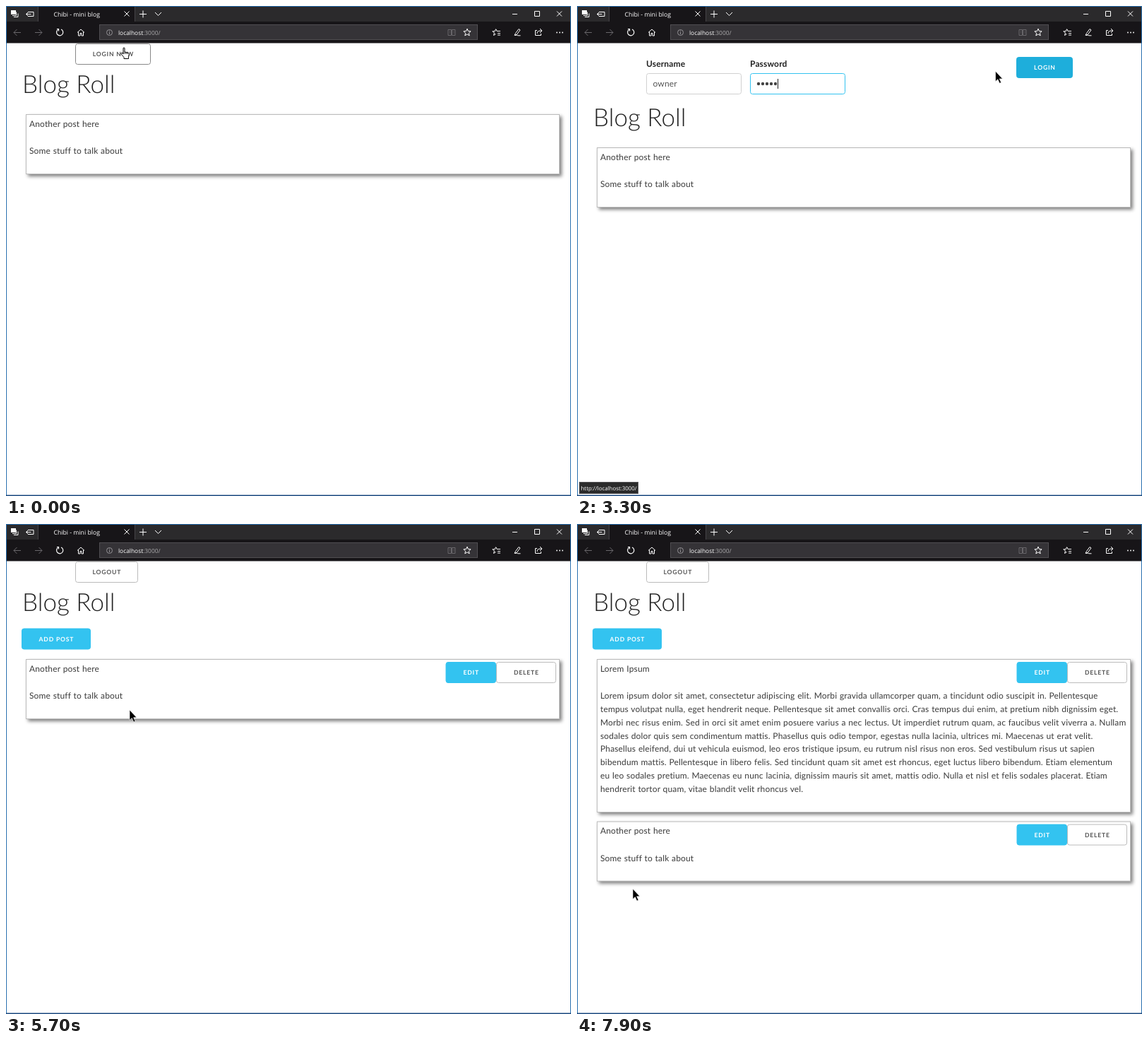
Write an HTML page that moves like this. It is 800 px wide and 693 px high and loops after 8 s.

```html
<!DOCTYPE html>
<html lang="en">
<head>
<meta charset="utf-8">
<title>Chibi - mini blog</title>
<style>
html, body { margin: 0; width: 100%; height: 100%; overflow: hidden; background: #fff; }
svg { display: block; width: 800px; height: 693px; }
text { font: 12px Lato, sans-serif; letter-spacing: .14px; word-spacing: .5px; fill: #3c3c3c; white-space: pre; text-rendering: geometricPrecision; }
.title { font-size: 35px; font-weight: 300; letter-spacing: 0; word-spacing: 0; fill: #222; }
.label { font-weight: 700; fill: #222; }
.entry { fill: #555; }
.btn { font-size: 8.6px; font-weight: 700; letter-spacing: .8px; word-spacing: 0; text-anchor: middle; fill: #555; }
.white { fill: #fff; }
.ui { font: 8.7px "Open Sans", sans-serif; letter-spacing: 0; word-spacing: 0; fill: #fff; }
.url { font-size: 8.4px; }
.status { font-size: 7.9px; }
.post { fill: #fff; stroke: #bbb; filter: drop-shadow(3px 3px 2.5px #808080); }
.icon { fill: none; stroke: #fff; }
.dim { stroke: #69676b; }
</style>
</head>
<body>
<svg id="stage" viewBox="0 0 800 693"></svg>
<script>
const stage = document.getElementById('stage');
const LOOP = 8000, STEP = 100, LINE = 18.87;
const BLUE = '#33c3f0';

// "|" breaks a line in the editor, "/" in a finished post
const LOREM = 'Lorem ipsum dolor sit amet, consectetur adipiscing elit. Morbi gravida ullamcorper quam, a tincidunt odio suscipit in. Pellentesque|/' +
  'tempus volutpat nulla, eget hendrerit neque. Pellentesque sit amet convallis orci. Cras tempus dui enim, at pretium nibh dignissim |eget. /' +
  'Morbi nec risus enim. Sed in orci sit amet enim posuere varius a nec lectus. Ut imperdiet rutrum quam, ac faucibus velit viverra a. |Nullam /' +
  'sodales dolor quis sem condimentum mattis. Phasellus quis odio tempor, egestas nulla lacinia, ultrices mi. Maecenas ut erat |velit. /' +
  'Phasellus eleifend, dui ut vehicula euismod, leo eros tristique ipsum, eu rutrum nisl risus non eros. Sed vestibulum risus ut sapien|/' +
  'bibendum mattis. Pellentesque in libero felis. Sed tincidunt quam sit amet est rhoncus, eget luctus libero bibendum. Etiam elementum|/' +
  'eu leo sodales pretium. Maecenas eu nunc lacinia, dignissim mauris sit amet, mattis odio. Nulla et nisl et felis sodales placerat. Etiam|/' +
  'hendrerit tortor quam, vitae blandit velit rhoncus vel.';

const text = (x, y, s, cls = '') => `<text x="${x}" y="${y}" class="${cls}">${s}</text>`;
const rect = (x, y, w, h, attrs) => `<rect x="${x}" y="${y}" width="${w}" height="${h}" ${attrs}/>`;
const icon = (d, cls = '', attrs = '') => `<path class="icon ${cls}" d="${d}" ${attrs}/>`;
const lines = (x, y, keep, drop) => LOREM.replaceAll(drop, '').split(keep)
  .map((s, i) => text(x, y + i * LINE, s)).join('');

function button(x, y, w, label, primary, hover) {
  const fill = primary ? (hover ? '#1eaedb' : BLUE) : '#fff';
  const stroke = primary ? fill : hover ? '#888' : '#bbb';
  return rect(x + .5, y + .5, w - 1, 29, `rx="3" fill="${fill}" stroke="${stroke}"`) +
    text(x + w / 2 + .4, y + 18, label, primary ? 'btn white' : 'btn');
}

const field = (x, y, w, h, focus) =>
  rect(x + .5, y + .5, w - 1, h - 1, `rx="3" fill="#fff" stroke="${focus ? BLUE : '#d1d1d1'}"`);
const caret = (x, y) => icon(`M${x + .5} ${y}v14`, '', 'style="stroke:#222"');

function post(y, title, body, h, owned) {
  return rect(28.5, y + .5, 755, h, 'class="post"') + text(33, y + 17.5, title) + body(y + 56) +
    (owned ? button(622.5, y + 4, 71.5, 'EDIT', true) + button(694, y + 4, 85, 'DELETE') : '');
}
const shortPost = (y, owned) =>
  post(y, 'Another post here', top => text(33, top, 'Some stuff to talk about'), 84, owned);
const longPost = y => post(y, 'Lorem Ipsum', top => lines(33, top, '/', '|'), 216, true);

const heading = y => text(23, y, 'Blog Roll', 'title');
const logout = () => button(98, 53, 89, 'LOGOUT');

const home = () => button(98, 53, 107, 'LOGIN NOW', false, true) + heading(123) + shortPost(153);

function loginForm(t) {
  const onName = t >= 800 && t < 2200, onPass = t >= 2200;
  const typed = t < 1500 ? 0 : t < 1700 ? 1 : Math.min(5, 2 + Math.floor((t - 1700) / 100));
  const dots = Math.max(0, Math.min(5, Math.floor((t - 2300) / 100)));
  let s = text(98, 86, 'Username', 'label') + text(245, 86, 'Password', 'label') +
    field(98, 95, 135, 30, onName) + field(245, 95, 135, 30, onPass) +
    text(107.5, 114, 'owner'.slice(0, typed), 'entry') +
    button(622, 72, 80, 'LOGIN', true, t >= 3300);
  if (onName) s += caret(107 + typed * 6.9, 103);
  if (onName && typed) s += icon('M211.5 106.5l7 7m0 -7l-7 7', '', 'style="stroke:#444"');
  for (let i = 0; i < dots; i++) s += `<circle cx="${257 + i * 6}" cy="110" r="2.2" fill="#444"/>`;
  if (onPass) s += caret(253 + dots * 6.2, 103);
  return s + heading(169.5) + shortPost(200);
}

const blog = (full, hover) => logout() + heading(123) + button(22, 147.5, 98, 'ADD POST', true, hover) +
  (full ? longPost(191) + shortPost(420.5, true) : shortPost(191, true));

const editor = t => logout() + text(22.5, 104, 'Creating New Post') +
  field(22, 109, 297, 52, t >= 6800 && t < 7000) + field(22, 172, 756, 315) +
  (t >= 6900 ? text(31, 129, 'Lorem Ipsum') : '') +
  (t >= 7100 ? lines(31, 191.5, '|', '/') : '') +
  button(22, 498, 87, 'SUBMIT', true, t >= 7500) + button(109, 498, 88, 'CANCEL');

function page(t) {
  if (t < 500) return home();
  if (t < 3500) return loginForm(t);
  if (t >= 4800 && t < 5200) return '';
  if (t < 6700) return blog(false, t >= 6300);
  return t < 7600 ? editor(t) : blog(true);
}

const star = (x, y, r) => 'M' + Array.from({ length: 10 }, (_, i) => {
  const a = i * Math.PI / 5, k = i % 2 ? r * .45 : r;
  return (x + k * Math.sin(a)).toFixed(1) + ' ' + (y - k * Math.cos(a)).toFixed(1);
}).join('L') + 'Z';

function chrome(t) {
  const loading = t >= 4800 && t < 5200, hover = t >= 4600 && t < 5300;
  let s = rect(0, 0, 800, 23, 'fill="#2b2a2c"') + rect(0, 22, 800, 30.5, 'fill="#171518"') +
    rect(45, 1, 137, 22, 'fill="#171518"') + icon('M45.5 1v21M182.5 1v21', '', 'style="stroke:#454447"') +
    rect(132.5, 26.5, 535, 21, 'fill="#353337" stroke="#504e52"');
  // title bar
  s += rect(7, 6, 7, 6, 'fill="#fff"') + icon('M9 13.5h5.5v-5M11 15.5h6v-5') +
    icon('M31 8.5h8v6h-8M28.5 11.5h7m-4.5 -2.5l-2.5 2.5l2.5 2.5') +
    text(67.5, 14.5, 'Chibi - mini blog', 'ui') +
    icon('M167.5 7.5l7 7m0 -7l-7 7M189 11.5h10m-5 -5v10M211 9l4.5 4.5l4.5 -4.5') +
    icon('M717 11.5h7M748.5 7.5h7v7h-7zM780 7.5l7 7m0 -7l-7 7');
  if (loading) s += `<circle cx="${51 + (t - 4900) / 100}" cy="15" r=".8" fill="#aaa"/>`;
  // toolbar
  if (hover) s += rect(62, 23, 28, 28.5, 'fill="#504e51"');
  s += icon('M21 37.5h-10m4.5 -4.5l-4.5 4.5l4.5 4.5M41 37.5h10m-4.5 -4.5l4.5 4.5l-4.5 4.5', 'dim') +
    icon(loading ? 'M72 33.5l8 8m0 -8l-8 8' : 'M73.5 33.5a4.6 4.6 0 1 0 4.5 -.5M72 32.5h2.5v3', '', 'stroke-width="1.2"') +
    icon('M101 37.5l5 -4.5l5 4.5M102.5 36.5v5.5h2.5v-3.5h2v3.5h2.5v-5.5') +
    '<circle cx="146.5" cy="37.5" r="4" class="icon" style="stroke:#929094"/>' +
    icon('M146.5 36.5v3.5M146.5 34.5v1', '', 'style="stroke:#929094"') +
    text(159, 40.5, 'localhost<tspan fill="#a9a8aa">:3000/</tspan>', 'ui url') +
    icon('M626 33.5h4.5v8h-4.5zM631.5 33.5h4.5v8h-4.5zM628 36h1m-1 2h1m4.5 -2h1m-1 2h1', 'dim') +
    icon(star(653, 37.5, 5.4)) +
    icon('M693.5 32.5l-1.3 3.3h-3.4l2.7 2.2l-1 3.5l3 -2M694 33l1 2.5h5M696 38.5h4M696 41h4') +
    icon('M720 41.5l1.5 -3l4.5 -6l2 1.5l-4.5 6l-3 1.5c3 0 4 -1 4 .3h4') +
    icon('M752 34.5h-2.5v7h8v-2.5M752 39c0 -3 2 -4 5 -4h2m-3 -3l3 3l-3 3', loading ? 'dim' : '');
  for (const x of [780, 784, 788]) s += `<circle cx="${x}" cy="37.5" r=".9" fill="#fff"/>`;
  if (t >= 3300 && t < 4000) s += rect(3.5, 673.5, 83, 16, 'fill="#2b2b2b" stroke="#59585a"') +
    text(5.5, 685, 'http://localhost:3000/', 'ui status');
  return s + rect(.5, .5, 799, 692, 'fill="none" stroke="#2a70b0"') + rect(0, 691.5, 800, 1.5, 'fill="#1c4a80"');
}

const POINTERS = {
  arrow: '<path d="M0 0v14.5l3.3 -3l2.5 5.5l2.3 -1l-2.5 -5.3h4.4z" fill="#000" stroke="#fff" stroke-width=".6"/>',
  hand: '<path d="M-1 1c0 -1.5 2 -1.5 2 0v5l5 1.2c1 .3 1.4 1 1.3 2l-.8 4v2.3h-6.5v-2l-4 -4.5c-1 -1.5 .8 -2.2 1.7 -1.2l1.3 1.2z" fill="#fff" stroke="#000"/><path d="M1 6v3m2 -2.5v2.5m2 -2v2" stroke="#000" stroke-width=".8"/>',
  beam: '<path d="M-2.5 -6.5h2l.5 .5l.5 -.5h2M0 -6v12.5M-2.5 6.5h5" fill="none" stroke="#000" stroke-width="1.2"/>'
};
// time, x, y, pointer shown from then on
const PATH = [
  [0, 167, 59, 'hand'], [500, 167, 59, 'arrow'], [800, 185, 109.5, 'beam'], [3000, 185, 109.5, 'arrow'],
  [3400, 668, 89, 'hand'], [3500, 672, 91, 'arrow'], [3700, 675, 92, 'arrow'], [3900, 650, 88, 'arrow'],
  [4600, 71, 38, 'arrow'], [5100, 71, 38, 'arrow'], [5700, 175, 263, 'arrow'], [5800, 175, 263, 'arrow'],
  [6300, 76, 161, 'hand'], [6700, 76, 161, 'arrow'], [6800, 90, 128, 'beam'], [6900, 92, 130, 'beam'],
  [7100, 121, 286.5, 'beam'], [7200, 121, 286.5, 'beam'], [7500, 79, 516, 'hand'], [7600, 79, 516, 'arrow'],
  [8000, 79, 516, 'arrow']
];

function pointer(t) {
  const i = PATH.findIndex(p => p[0] > t);
  const [t0, x0, y0, kind] = PATH[i - 1], [t1, x1, y1] = PATH[i];
  const u = (t - t0) / (t1 - t0), k = u * u * (3 - 2 * u);
  return `<g transform="translate(${x0 + (x1 - x0) * k} ${y0 + (y1 - y0) * k})">${POINTERS[kind]}</g>`;
}

let shown = -1;
function draw(now) {
  const t = Math.floor(now % LOOP / STEP) * STEP;
  if (t !== shown) {
    shown = t;
    stage.innerHTML = rect(0, 0, 800, 693, 'fill="#fff"') + page(t) + chrome(t) + pointer(t);
  }
  requestAnimationFrame(draw);
}
draw(0);
</script>
</body>
</html>
```
